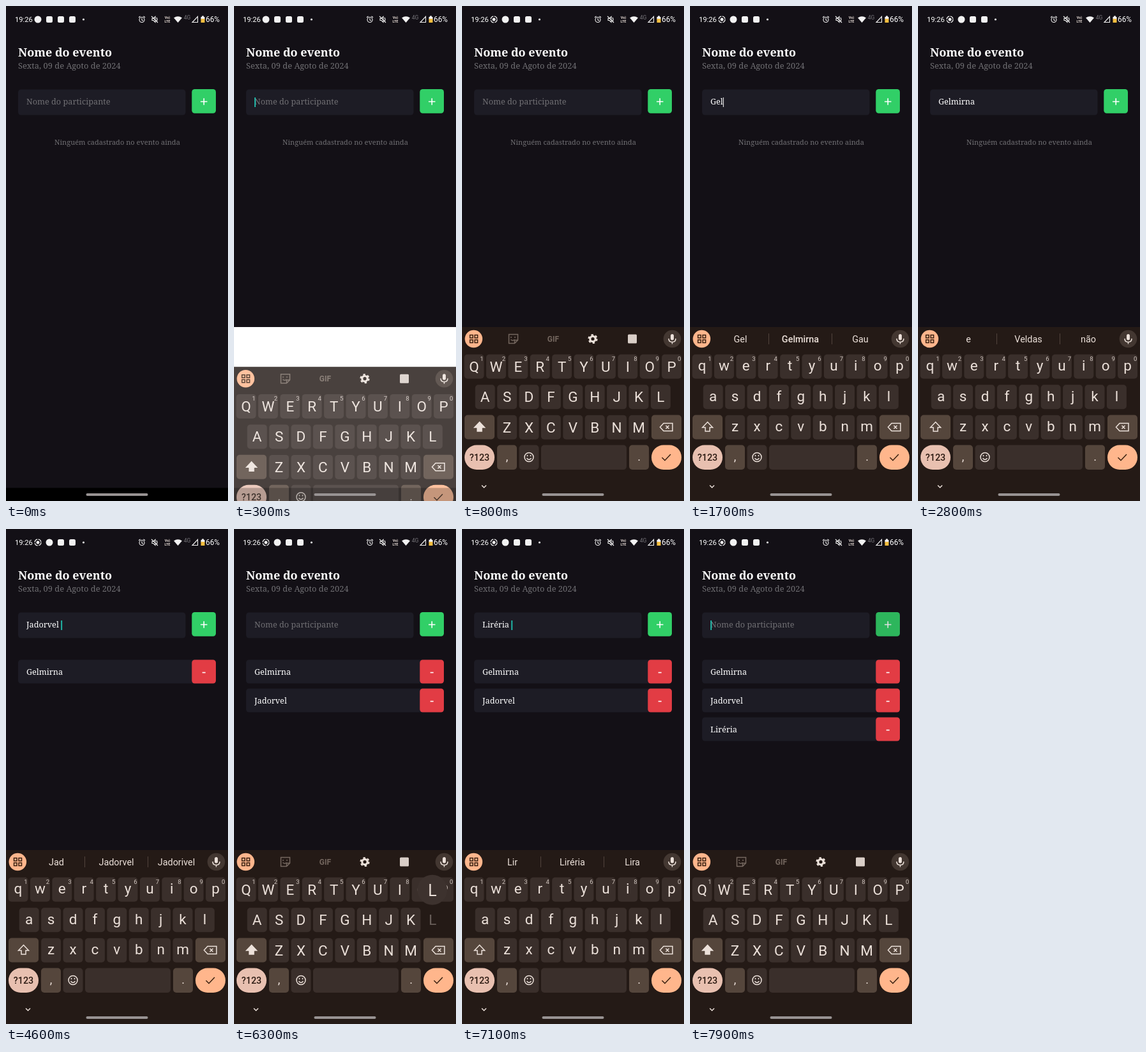
Write an HTML page that moves like this. It is 348 px wide and 774 px high and loops after 8000 ms.

```html
<!DOCTYPE html>
<html lang="pt-BR">
<head>
<meta charset="utf-8">
<title>Nome do evento</title>
<style>
  html, body { margin: 0; width: 100%; height: 100%; overflow: hidden; background: #131016; }
  svg { display: block; width: 100vw; height: 100vh; }
  text { white-space: pre; }
  .serif { font-family: "Noto Serif", serif; font-size: 12.7px; fill: #fff; }
  .name { font-weight: 500; }
  .sans { font-family: Roboto, "Open Sans", sans-serif; fill: #ece1da; }
  .muted { fill: #706f73; }
  .mid { text-anchor: middle; }
  .line { fill: none; stroke: #ece1da; stroke-width: 1.5; }
  .dim { stroke: #74675f; }
  .dark { stroke: #3a2010; }
  .key { fill: #3a2f2b; }
  .mod { fill: #55463c; }
  .accent { fill: #ffb68c; }
  .box { fill: #1d1c25; }
  .del { fill: #e23c44; }
  .sign { stroke: #fff; stroke-width: 1.6; fill: none; }
</style>
</head>
<body>
<svg viewBox="0 0 348 774">
  <rect width="348" height="774" fill="#131016"/>

  <!-- status bar -->
  <g fill="#f2f2f2">
    <text class="sans" x="14" y="25" font-size="11.2" style="fill:#fff">19:26</text>
    <g id="notes">
      <g id="rec" opacity="0">
        <circle cx="32" cy="21" r="4.9" fill="none" stroke="#f2f2f2" stroke-width="1.3" stroke-dasharray="6.2 1.5"/>
        <circle cx="32" cy="21" r="2.5"/>
      </g>
      <circle cx="50" cy="21" r="5.5"/>
      <rect x="63" y="16" width="10" height="10" rx="2.5"/>
      <rect x="81" y="16" width="10" height="10" rx="2.5"/>
      <rect id="lastNote" x="99" y="16" width="10" height="10" rx="2.5"/>
    </g>
    <circle cx="121.500" cy="21" r="1.6"/>
    <g fill="none" stroke="#f2f2f2" stroke-width="1.1">
      <circle cx="213" cy="21.500" r="4"/>
      <path d="M213 19v3l2 1M208 18l2.500-2M218 18l-2.500-2"/>
      <path d="M229 19.500h2l3-3v9l-3-3h-2zM236 18q2 3 0 6M228 16l10 10"/>
      <path d="M292 25.500h8.500v-9z"/>
    </g>
    <text class="sans mid" x="253" y="20" font-size="5.500" font-weight="700">Vo)</text>
    <text class="sans mid" x="253" y="25.500" font-size="5.500" font-weight="700">LTE</text>
    <path d="M263 18.500q6.500-4.500 13 0l-6.500 7.500z"/>
    <text class="sans mid" x="284" y="21" font-size="8.500" style="fill:#77757a">4G</text>
    <path d="M305.500 17h1.500v-1.500h3v1.500h1.500v4h-6z"/>
    <rect x="305.500" y="20" width="6" height="6" fill="#f3bd3f"/>
    <text class="sans" x="313" y="25" font-size="11.900" style="fill:#fff">66%</text>
  </g>

  <!-- form -->
  <text class="serif" x="19" y="78.500" style="font-size:18px" font-weight="700">Nome do evento</text>
  <text class="serif muted" x="19" y="98" style="font-size:12.85px">Sexta, 09 de Agoto de 2024</text>
  <rect class="box" x="19" y="130.500" width="262.500" height="40" rx="4.500"/>
  <text id="hint" class="serif muted" x="32" y="154">Nome do participante</text>
  <text id="field" class="serif name" x="32" y="154"></text>
  <rect id="caret" y="143" width="2" height="15"/>
  <g id="add">
    <rect x="291.300" y="130" width="37.700" height="37.700" rx="4.500" fill="#31cf67"/>
    <path class="sign" d="M305 149.500h10.500M310.250 144.250v10.500"/>
  </g>
  <text id="empty" class="serif muted mid" x="174.500" y="216.500" style="font-size:11.05px">Ninguém cadastrado no evento ainda</text>
  <g id="list"></g>

  <!-- keyboard -->
  <rect id="gap" y="502" width="348" height="272" fill="#fff"/>
  <g id="board">
    <rect y="502" width="348" height="272" fill="#241a16"/>
    <circle class="accent" cx="18.300" cy="520.500" r="13.800"/>
    <path class="line dark" d="M12.500 514.500h4.500v4.500h-4.500zM20 514.500h4.500v4.500h-4.500zM12.500 522h4.500v4.500h-4.500zM20 522h4.500v4.500h-4.500z"/>
    <circle cx="329.500" cy="520.500" r="13.800" fill="#433731"/>
    <rect x="327" y="513" width="5" height="9.500" rx="2.500" fill="#ece1da"/>
    <path class="line" d="M324 520q0 5.500 5.500 5.500t5.500-5.500M329.500 525.500v3"/>

    <g id="tools">
      <path class="line dim" d="M73.500 513.500h14v9l-5 5h-9zM82.500 527.500v-5h5M77 517v2M83 517v2M76.500 521.500q3 3 6 0"/>
      <text class="sans mid" x="143" y="524.500" font-size="12" font-weight="700" style="fill:#74675f">GIF</text>
      <circle cx="205" cy="520.500" r="4.200" fill="none" stroke="#ece1da" stroke-width="3.200"/>
      <circle cx="205" cy="520.500" r="6.400" fill="none" stroke="#ece1da" stroke-width="2.400" stroke-dasharray="3.350 3.350"/>
      <rect x="260" y="513.500" width="14" height="14" rx="1.500" fill="#d9cec7"/>
    </g>
    <g id="words">
      <path d="M123.500 512v17M222.500 512v17" stroke="#51443c"/>
      <text class="sans mid" x="79" y="525.500" font-size="14.400"></text>
      <text class="sans mid" x="173" y="525.500" font-size="14.400"></text>
      <text class="sans mid" x="267" y="525.500" font-size="14.400"></text>
    </g>

    <g id="keys"></g>
    <rect class="mod" x="4" y="639.500" width="47" height="38" rx="5"/>
    <path id="shift" class="line" d="M27.500 650.500l8 8.500h-4.500v6h-7v-6h-4.500z"/>
    <rect class="mod" x="297" y="639.500" width="47" height="38" rx="5"/>
    <path class="line" d="M310.500 658.500l5.500-6h14v12h-14zM319.500 656l5 5m0-5l-5 5"/>

    <rect x="4" y="686.500" width="47" height="38.500" rx="19" fill="#e8c0b0"/>
    <text class="sans mid" x="27.500" y="710.500" font-size="14.300" font-weight="500" style="fill:#2c1a12">?123</text>
    <rect class="mod" x="55" y="686.500" width="31" height="38.500" rx="5"/>
    <text class="sans mid" x="70.500" y="711" font-size="18">,</text>
    <rect class="key" x="89.500" y="686.500" width="31" height="38.500" rx="5"/>
    <circle class="line" cx="105" cy="705.500" r="7"/>
    <path class="line" d="M102.500 702v2.200M107.500 702v2.200M101.500 707q3.500 4.500 7 0"/>
    <rect class="key" x="124" y="686.500" width="134" height="38.500" rx="5"/>
    <rect class="mod" x="262" y="686.500" width="31" height="38.500" rx="5"/>
    <text class="sans mid" x="277.500" y="711" font-size="18">.</text>
    <rect class="accent" x="297" y="686.500" width="47" height="38.500" rx="19"/>
    <path class="line dark" d="M313.500 706l4.500 4.500 9-9.500"/>
    <path class="line" d="M31 749.500l3.500 3.500 3.500-3.500"/>

    <g id="popup">
      <circle r="23.500" fill="#3d322e"/>
      <text class="sans mid" y="9.500" font-size="25"></text>
    </g>
  </g>

  <rect id="nav" y="753.500" width="348" height="21"/>
  <rect x="125.500" y="762" width="97" height="4" rx="2" fill="#989393"/>
</svg>

<script>
const LOOP = 8000, BLINK = 510, SLIDE = 260, OPEN = 200;
const NS = 'http://www.w3.org/2000/svg';
const $ = id => document.getElementById(id);
const clamp = v => Math.min(1, Math.max(0, v));
const show = (el, on) => el.style.display = on ? '' : 'none';
const write = (el, s) => { if (el.textContent !== s) el.textContent = s; };

function make(parent, tag, attrs, text = '') {
  const el = document.createElementNS(NS, tag);
  for (const k in attrs) el.setAttribute(k, attrs[k]);
  el.textContent = text;
  return parent.appendChild(el);
}

const people = ['Gelmirna', 'Jadorvel', 'Liréria'];
const next = ['e', 'Veldas', 'não'];
const guesses = [
  ['Gel', 'Gelmirna', 'Gau'],
  ['Jad', 'Jadorvel', 'Jadorivel'],
  ['Lir', 'Liréria', 'Lira']
];

// time, field text, suggestions (none = tool icons)
const steps = [
  [160, ''],
  [990, 'G'], [1270, 'Ge', guesses[0]], [1470, 'Gel', guesses[0]], [1960, 'Gelmirna ', next],
  [2960, ''],
  [3880, 'J'], [3990, 'Ja', guesses[1]], [4110, 'Jad', guesses[1]], [4600, 'Jadorvel ', guesses[1]],
  [5360, ''],
  [6370, 'L'], [6580, 'Li', guesses[2]], [6790, 'Lir', guesses[2]], [7060, 'Liréria ', guesses[2]],
  [7700, '']
];
// the words after a picked name arrive a little later
const lateWords = [[4660, 5360], [7150, 7700]];
const presses = [[2840, 2960], [5220, 5360], [7550, 7700]];

const rows = people.map((name, i) => {
  const g = make($('list'), 'g', { transform: `translate(0 ${204.5 + 45 * i})` });
  make(g, 'rect', { class: 'box', x: 19, width: 310, height: 37, rx: 4.5 });
  make(g, 'rect', { class: 'del', x: 291.3, width: 37.7, height: 37, rx: 4.5 });
  make(g, 'path', { class: 'sign', d: 'M307.700 20h5' });
  make(g, 'text', { class: 'serif name', x: 32, y: 23.5 }, name);
  return g;
});

const keys = {};
[['qwertyuiop', 19], ['asdfghjkl', 36.2], ['zxcvbnm', 70.6]].forEach(([letters, x0], r) => {
  [...letters].forEach((ch, i) => {
    const x = x0 + 34.4 * i, y = 563.7 + 47.5 * r;
    const cap = make($('keys'), 'rect', { class: 'key', x: x - 15.5, y: y - 19, width: 31, height: 38, rx: 5 });
    const label = make($('keys'), 'text', { class: 'sans mid', x, 'font-size': 22.5 });
    if (!r) make($('keys'), 'text', { class: 'sans mid', x: x + 12, y: y - 8.5, 'font-size': 9.5, opacity: .85 }, String((i + 1) % 10));
    keys[ch] = { x, y, cap, label };
  });
});

const words = $('words').querySelectorAll('text');
const popText = $('popup').querySelector('text');

function buttonOpacity(t) {
  for (const [down, up] of presses) {
    const low = 1 - .8 * clamp((up - down) / 150);
    if (t >= down && t < up) return 1 - .8 * clamp((t - down) / 150);
    if (t >= up && t < up + 240) return low + (1 - low) * (t - up) / 240;
  }
  return 1;
}

function drawField(t, text, since) {
  write($('field'), text);
  show($('hint'), !text);
  const typing = text && !text.endsWith(' ');
  const caret = $('caret');
  show(caret, t >= steps[0][0] && (t - since) % (2 * BLINK) < BLINK);
  caret.setAttribute('x', text ? 32 + $('field').getComputedTextLength() : 32);
  caret.setAttribute('width', typing ? 1.2 : 2);
  caret.setAttribute('fill', typing ? '#dcdcdc' : '#1fb3a4');
}

function drawKeys(t, text, list) {
  const upper = !text;
  const hit = steps.find(([at, s]) => s && !s.endsWith(' ') && t >= at - 90 && t < at);
  const active = hit && hit[1].slice(-1).toLowerCase();
  for (const ch in keys) {
    const { y, cap, label } = keys[ch];
    write(label, upper ? ch.toUpperCase() : ch);
    label.setAttribute('y', y + (upper ? 8 : 6.5));
    label.setAttribute('opacity', ch === active ? .35 : 1);
    show(cap, ch !== active);
  }
  show($('popup'), active);
  if (active) {
    write(popText, keys[active].label.textContent);
    $('popup').setAttribute('transform', `translate(${keys[active].x - .5} ${keys[active].y - 47})`);
  }
  $('shift').style.fill = upper ? '#ece1da' : 'none';
  show($('tools'), !list);
  show($('words'), list);
  if (list) list.forEach((w, i) => write(words[i], w));
  words[1].setAttribute('font-weight', list === guesses[0] ? 500 : 400);
}

function drawBoard(t) {
  const rest = (1 - clamp((t - OPEN) / SLIDE)) ** 3;
  const open = t > OPEN;
  show($('board'), open);
  show($('gap'), open && rest > 0);
  $('board').setAttribute('transform', `translate(0 ${272 * rest})`);
  $('board').setAttribute('opacity', 1 - .75 * rest);
  $('nav').setAttribute('opacity', rest);
}

function drawStatus(t) {
  const p = clamp((t - 300) / 300), e = p * p * (3 - 2 * p);
  $('notes').setAttribute('transform', `translate(${18 * e} 0)`);
  $('rec').setAttribute('opacity', e);
  $('lastNote').setAttribute('opacity', 1 - e);
}

function render(t) {
  let [since, text, list] = steps[0];
  for (const s of steps) if (t >= s[0]) [since, text, list] = s;
  if (lateWords.some(([a, b]) => t >= a && t < b)) list = next;

  drawStatus(t);
  drawField(t, text, since);
  $('add').setAttribute('opacity', buttonOpacity(t));
  rows.forEach((row, i) => show(row, t >= presses[i][1]));
  show($('empty'), t < presses[0][1]);
  drawKeys(t, text, list);
  drawBoard(t);
}

const start = performance.now();
function tick() {
  render((performance.now() - start) % LOOP);
  requestAnimationFrame(tick);
}
tick();
</script>
</body>
</html>
```
